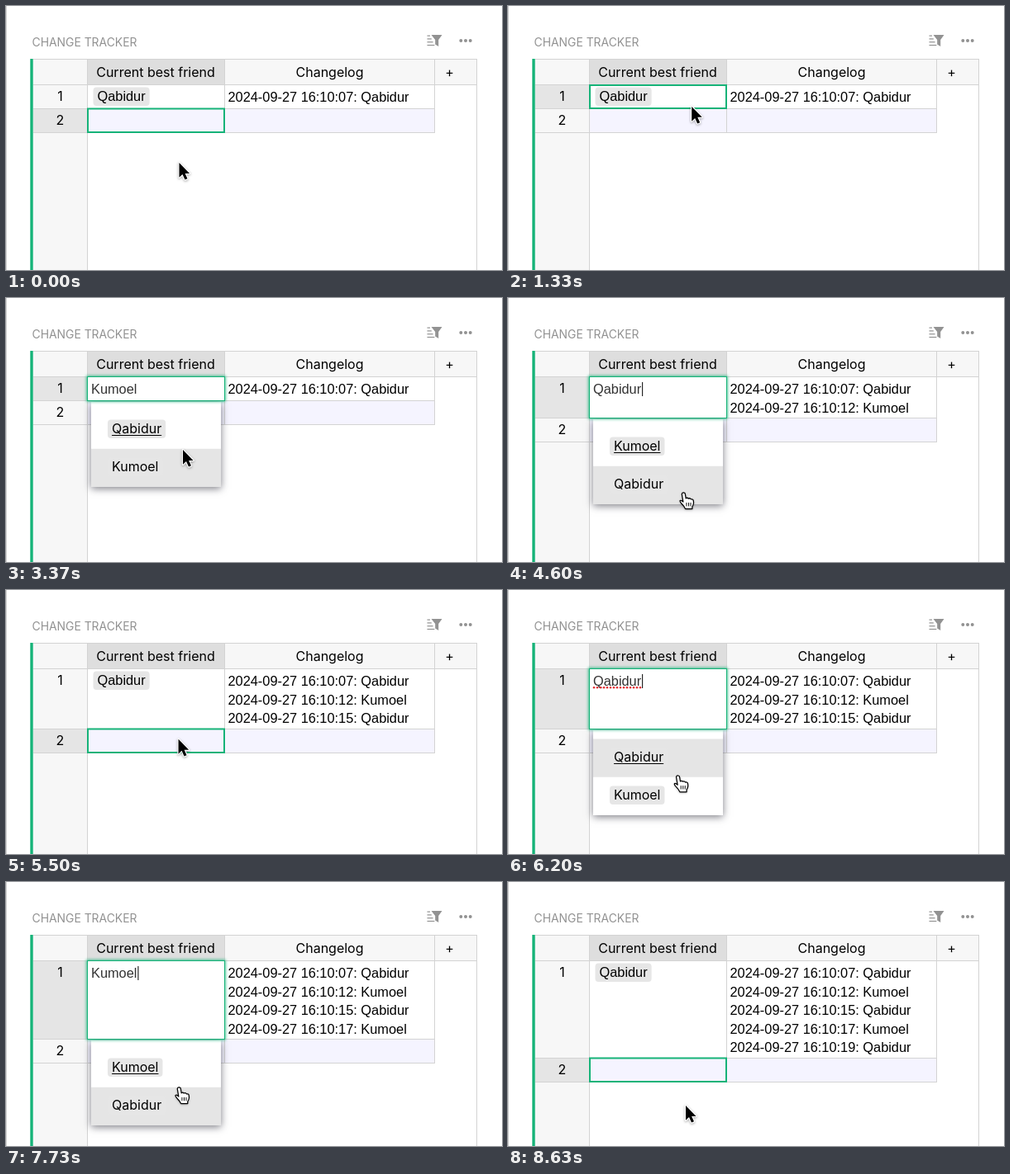
An HTML page with a canvas that plays this animation: 600x320 px, repeating every 8.92 s.

```html
<!DOCTYPE html>
<html lang="en">
<head>
<meta charset="utf-8">
<title>Change tracker</title>
<style>
  html, body { margin: 0; width: 100%; height: 100%; overflow: hidden; background: #fff; }
  canvas { display: block; width: 600px; height: 320px; }
</style>
</head>
<body>
<canvas id="stage" width="600" height="320"></canvas>
<script>
const ctx = document.getElementById('stage').getContext('2d');
const LOOP = 8920;
const GREEN = '#16b378', LINE = '#d3d3d3', PALE = '#f7f7f7', CHIP = '#e6e6e6', GRAY = '#929292';
const CELL = '16.35px "Liberation Sans", Arial, sans-serif';
const UI = '16px Inter, Roboto, sans-serif';
const TITLE = '13.9px Inter, Roboto, sans-serif';
const NAMES = ['Qabidur', 'Kumoel'];
const SECONDS = ['07', '12', '15', '17', '19'];
const GROW_DELAY = 180;

const nameAt = i => NAMES[i % 2];

// Each change of the cell: row selected, editor opened, item picked, editor closed (ms).
const edits = [
  [1000, 2770, 3270, 3430],
  [4170, 4330, 4590, 4830],
  [5700, 5870, 6470, 6535],
  [7300, 7400, 7840, 7930]
].map(([select, open, pick, close], i) => ({
  select, open, pick, close, from: nameAt(i), to: nameAt(i + 1), hand: i > 0, spell: i === 2
}));

// Pointer moves: start, end, x, y; it rests in between.
const home = { x: 209.5, y: 190 };
const moves = [
  [600, 1030, 218, 116],
  [1270, 1570, 257, 171],
  [2200, 2600, 205.5, 112],
  [2800, 3110, 214, 184],
  [3930, 4150, 207, 121],
  [4350, 4610, 213, 237],
  [5270, 5700, 205, 136],
  [5960, 6295, 206.5, 247],
  [7000, 7280, 197, 134],
  [7570, 7780, 212, 268],
  [8000, 8230, 215, 271]
];

function pointerAt(t) {
  let { x, y } = home;
  for (const [start, end, toX, toY] of moves) {
    const u = Math.min(1, Math.max(0, (t - start) / (end - start)));
    const k = u * u * (3 - 2 * u);
    x += (toX - x) * k;
    y += (toY - y) * k;
  }
  return { x, y };
}

function rect(x, y, w, h, color) {
  ctx.fillStyle = color;
  ctx.fillRect(x, y, w, h);
}

function hline(y, x0, x1) { rect(x0, y, x1 - x0, 1, LINE); }
function vline(x, y0, y1) { rect(x, y0, 1, y1 - y0, LINE); }

function dot(x, y, r, color) {
  ctx.fillStyle = color;
  ctx.beginPath();
  ctx.arc(x, y, r, 0, 7);
  ctx.fill();
}

function text(str, x, y, font, color = '#000', align = 'left') {
  ctx.font = font;
  ctx.fillStyle = color;
  ctx.textAlign = align;
  ctx.fillText(str, x, y);
}

function chip(str, x, baseline, font) {
  ctx.font = font;
  ctx.fillStyle = CHIP;
  ctx.beginPath();
  ctx.roundRect(x - 5, baseline - 16.5, ctx.measureText(str).width + 10, 22.5, 4);
  ctx.fill();
  text(str, x, baseline, font);
}

// Soft shadow of a box, without the box itself.
function shadow(x, y, w, h, color, blur) {
  const away = 2000;
  ctx.save();
  ctx.shadowColor = color;
  ctx.shadowBlur = blur;
  ctx.shadowOffsetX = away;
  rect(x - away, y, w, h, '#000');
  ctx.restore();
}

const funnel = new Path2D('M514.5 35H527.5L523.2 41V49L519.2 46.5V41Z');

function drawToolbar() {
  text('CHANGE TRACKER', 31.5, 49, TITLE, GRAY);
  for (let i = 0; i < 4; i++) rect(509.5, 35.5 + 3.8 * i, 3.5 + 1.8 * i, 1.2, GRAY);
  ctx.fill(funnel);
  for (let i = -1; i <= 1; i++) dot(556 + 5.7 * i, 42, 2, GRAY);
}

function drawGrid(lines, value, rowOne) {
  const mid = Math.max(124, Math.floor(100.5 + 22.5 * lines));
  const end = mid + 29;

  rect(33, 65, 536, 30, PALE);
  rect(99, 65, 165, 30, '#dedede');
  rect(33, 96, 65, 224, PALE);
  if (rowOne) rect(33, 96, 65, mid - 96, '#e5e5e5');
  else rect(33, mid, 65, 29, '#e5e5e5');
  rect(99, mid, 419, 29, '#f5f4ff');

  for (const y of [64, 95]) hline(y, 33, 570);
  for (const y of [mid, end]) hline(y, 33, 519);
  for (const x of [264, 518]) vline(x, 64, end + 1);
  for (const x of [98, 569]) vline(x, 64, 320);
  vline(0, 0, 320);
  rect(29.3, 64, 3.4, 256, GREEN);

  text('Current best friend', 181, 86, UI, '#000', 'center');
  text('Changelog', 391.5, 86, UI, '#000', 'center');
  text('+', 536.5, 86, UI, '#000', 'center');
  text('1', 65.5, 115, UI, '#000', 'center');
  text('2', 65.5, mid + 20, UI, '#000', 'center');

  chip(value, 110.5, 115, CELL);
  for (let i = 0; i < lines; i++) {
    text(`2024-09-27 16:10:${SECONDS[i]}: ${nameAt(i)}`, 268.5, 116 + 22.6 * i, CELL);
  }

  ctx.strokeStyle = GREEN;
  ctx.lineWidth = 2;
  if (rowOne) ctx.strokeRect(99, 96, 165, mid - 96);
  else ctx.strokeRect(99, mid + 0.5, 165, 28.5);
  return mid;
}

function drawList(edit, bottom, hover) {
  const top = bottom + 12.5, step = 46.25;
  shadow(103, bottom + 4, 157, 103, 'rgba(38,38,51,.6)', 9);
  rect(103, bottom + 2, 157, 103, '#fff');
  [edit.from, edit.to].forEach((name, i) => {
    const y = top + i * step;
    const base = Math.round(y + 27.5);
    if (hover === i) rect(103, y, 157, step, '#e5e5e5');
    chip(name, 128, base, UI);
    if (i === 0) rect(128, base + 2, ctx.measureText(name).width, 1, '#000');
  });
}

function drawEditor(edit, t, bottom) {
  const picked = t >= edit.pick;
  const value = picked ? edit.to : edit.from;
  shadow(96.7, 93.7, 169.6, bottom - 91.4, GREEN, 3.6);
  rect(99, 96, 165, bottom - 96, '#fff');
  text(value, 103, 116, CELL, '#333');
  const width = ctx.measureText(value).width;
  if (edit.hand || !picked) rect(104 + width, 102, 1, 17, '#000');
  if (edit.spell && !picked) {
    for (let x = 104; x < 103 + width; x += 4) dot(x, 118.3, 1.2, '#e0262b');
  }
}

const arrow = new Path2D('M0 0V17.8L4 14L7 20.6L10 19.3L7.1 12.9H12.6Z');
const hand = new Path2D('M-2 1.5Q-1.5 -.5 .5 -.3Q2.3 0 2.4 2L3.2 7Q5 5.6 6.4 7.3Q8.4 6.2 9.8 8.2' +
  'Q12.3 7.6 12.8 10.2L13 13Q12.6 16 11.2 17.8V20.5H2.6Q1 17 -2.5 13.5Q-5 10.8 -4.2 9.8Q-2.6 9 -.3 11.5Z');
const knuckles = new Path2D('M4 12.5V17M6.7 12.5V17M9.3 12.5V17');

function drawPointer({ x, y }, isHand) {
  ctx.save();
  ctx.translate(x, y);
  ctx.lineJoin = 'round';
  ctx.shadowColor = 'rgba(0,0,0,.35)';
  ctx.shadowBlur = 3;
  ctx.shadowOffsetY = 1;
  if (isHand) {
    ctx.translate(-0.8, -0.4);
    ctx.scale(0.95, 0.95);
    ctx.fillStyle = '#fff';
    ctx.fill(hand);
    ctx.shadowColor = 'transparent';
    ctx.strokeStyle = '#000';
    ctx.lineWidth = 1.3;
    ctx.stroke(hand);
    ctx.lineWidth = 1;
    ctx.stroke(knuckles);
  } else {
    ctx.strokeStyle = '#fff';
    ctx.lineWidth = 2.4;
    ctx.stroke(arrow);
    ctx.shadowColor = 'transparent';
    ctx.fillStyle = '#000';
    ctx.fill(arrow);
  }
  ctx.restore();
}

function draw(t) {
  const pointer = pointerAt(t);
  const active = edits.find(e => t >= e.select && t < e.close);
  const done = edits.filter(e => t >= e.close).length;
  const lines = 1 + edits.filter(e => t >= e.close + GROW_DELAY).length;

  rect(0, 0, 600, 320, '#fff');
  drawToolbar();
  const mid = drawGrid(lines, nameAt(done), Boolean(active));
  let hover = -1;
  if (active && t >= active.open) {
    hover = Math.floor((pointer.y - mid - 12.5) / 46.25);
    drawList(active, mid, hover);
    drawEditor(active, t, mid);
  }
  drawPointer(pointer, hover >= 0 && active.hand);
}

const start = performance.now();
function tick() {
  draw((performance.now() - start) % LOOP);
  requestAnimationFrame(tick);
}
tick();
</script>
</body>
</html>
```
